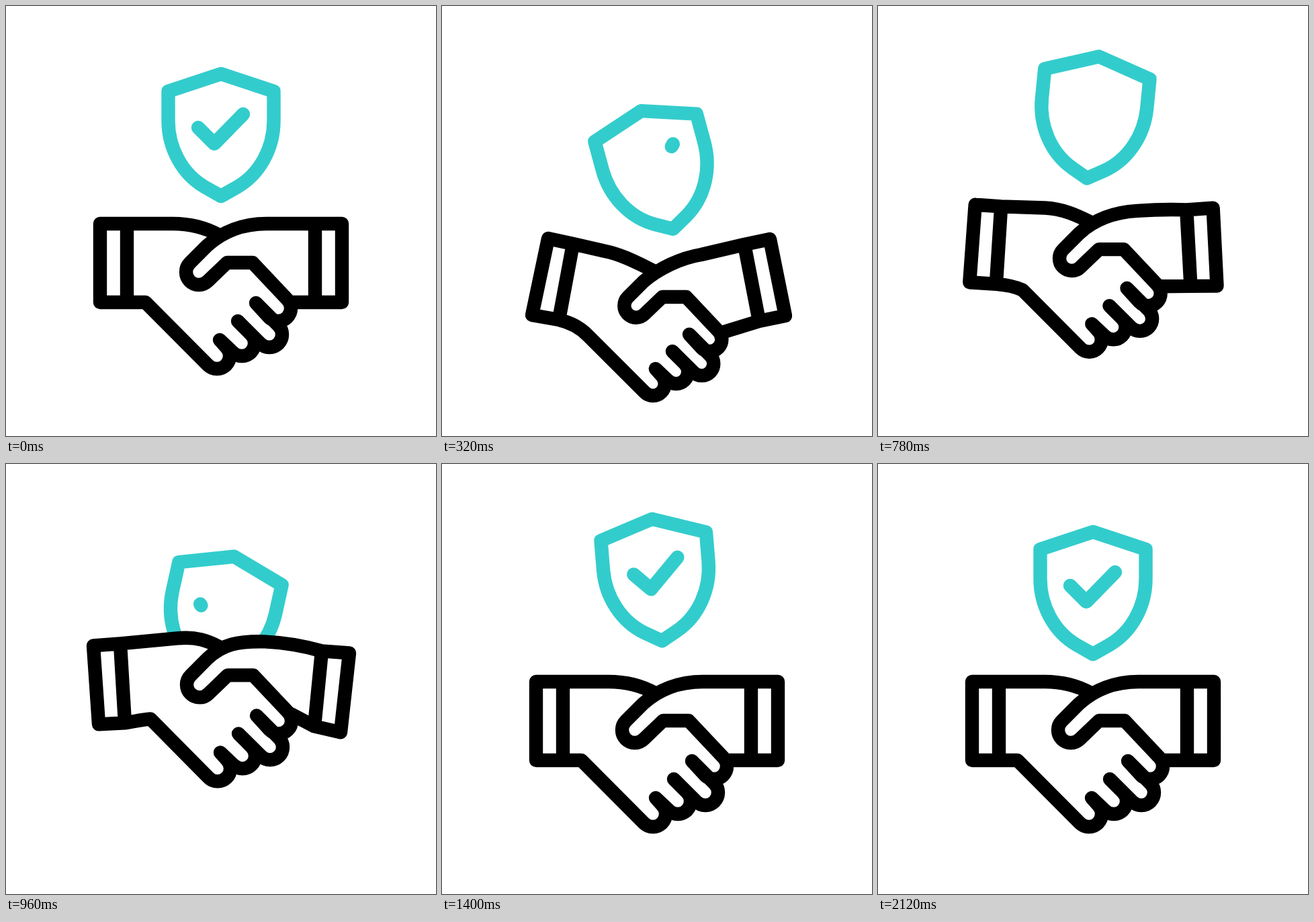
An HTML page with a canvas for the animation above (2400 ms loop, 640x640 px).

```html
<!DOCTYPE html>
<html lang="en">
<head>
<meta charset="utf-8">
<title>Handshake and shield</title>
<style>
html, body { margin: 0; width: 100%; height: 100%; overflow: hidden; background: #fff; }
canvas { display: block; width: 640px; height: 640px; }
</style>
</head>
<body>
<canvas id="stage" width="640" height="640"></canvas>
<script>
const ctx = document.getElementById('stage').getContext('2d');
const LOOP = 2400, STEP = 20;
const TEAL = '#33cccc', INK = '#000';

// Smooth curve through [time, value] keys, flat at each turning point.
function curve(keys) {
  const n = keys.length;
  const slope = i => (keys[i + 1][1] - keys[i][1]) / (keys[i + 1][0] - keys[i][0]);
  const tan = keys.map((k, i) => {
    if (i === 0 || i === n - 1) return 0;
    const a = slope(i - 1), b = slope(i);
    return a * b > 0 ? 2 * a * b / (a + b) : 0;
  });
  return t => {
    if (t <= keys[0][0]) return keys[0][1];
    if (t >= keys[n - 1][0]) return keys[n - 1][1];
    let i = 0;
    while (t > keys[i + 1][0]) i++;
    const [t0, v0] = keys[i], [t1, v1] = keys[i + 1];
    const d = t1 - t0, u = (t - t0) / d, w = 1 - u;
    return v0 * (1 + 2 * u) * w * w + v1 * u * u * (3 - 2 * u)
      + d * u * w * (tan[i] * w - tan[i + 1] * u);
  };
}

const handY = curve([[0, 0], [320, 40], [445, 58], [540, 48], [620, 28], [960, -67.6], [1005, -69], [1360, 0]]);
const lowMix = curve([[0, 0], [320, 1], [480, 1.12], [620, 1], [960, 0]]);
const highMix = curve([[620, 0], [960, 1], [1010, 1.04], [1360, 0]]);
const shieldY = curve([[0, 0], [320, 52], [370, 54], [620, -18.3], [720, -36], [960, 34.6], [990, 36.5], [1390, -19.5], [1825, 16.5], [2120, 0]]);
const shieldTilt = curve([[0, 0], [320, -15.2], [350, -15.5], [620, -3], [960, 12.5], [975, 12.6], [1400, -4.7], [1800, 2.9], [2120, 0]]);
const wipe = curve([[0, 0], [367, 1]]);
const write = curve([[925, 0], [1290, 1]]);

// Arm points: at rest, hands low, hands high (x, y each).
const ARMS = {
  cuffT:    [140, 324, 158, 306, 130, 338],
  cuffB:    [140, 441, 134, 420, 138, 455],
  bandT:    [180, 324, 195, 314, 170, 335],
  bandB:    [180, 441, 174, 427, 177, 453],
  wrist:    [248, 324, 243, 325, 255, 327],
  wristA:   [276, 324, 268, 330, 283, 324],
  wristB:   [299, 331, 292, 343, 301, 331],
  meet:     [317, 341, 317, 355, 318, 340],
  heelA:    [190, 441, 191, 431, 190, 451],
  heelB:    [200, 441, 206, 439, 203, 448],
  heel:     [207.5, 441, 217, 450.3, 215, 447],
  thumb:    [299, 357, 300, 370, 300, 357],
  thumbA:   [322, 336, 322, 351, 322, 336],
  thumbB:   [353, 324, 355, 335, 345, 331],
  back:     [388, 324, 386, 330, 385, 332],
  rBandT:   [460, 324, 450, 315, 470, 346],
  rCuffT:   [500, 324, 488, 307, 511, 349],
  rCuffB:   [500, 441, 511, 421, 498, 467],
  rBandB:   [460, 441, 472, 429, 459, 458],
  rEnd:     [425, 441, 420, 445, 425, 440]
};
const SLEEVE = [424, 324, 418, 322.5, 428, 334];

const FINGERS = [[314, 521], [351, 502], [392, 489], [405, 450]];
const SLOTS = [[318, 497], [345, 469], [372, 442]];
const TIP = 19;

const move = p => ctx.moveTo(p[0], p[1]);
const line = (...ps) => ps.forEach(p => ctx.lineTo(p[0], p[1]));
const bend = (a, b, c) => ctx.bezierCurveTo(a[0], a[1], b[0], b[1], c[0], c[1]);

function drawShield(t) {
  ctx.save();
  ctx.translate(320, 191.5 + shieldY(t));
  ctx.rotate(shieldTilt(t) * Math.PI / 180);
  ctx.translate(-320, -191.5);
  ctx.strokeStyle = TEAL;

  ctx.beginPath();
  ctx.moveTo(320, 101);
  ctx.lineTo(241.5, 127);
  ctx.lineTo(241.5, 171);
  ctx.bezierCurveTo(241.5, 211, 262, 250, 296, 269.5);
  ctx.lineTo(320, 283);
  ctx.lineTo(344, 269.5);
  ctx.bezierCurveTo(378, 250, 398.5, 211, 398.5, 171);
  ctx.lineTo(398.5, 127);
  ctx.closePath();
  ctx.stroke();

  const from = t < 925 ? wipe(t) : 0;
  const to = t < 925 ? 1 : write(t);
  if (to > from) {
    const len = 95.5;
    ctx.beginPath();
    ctx.moveTo(286, 181);
    ctx.lineTo(310, 205);
    ctx.lineTo(353, 161);
    if (to - from < 1) {
      ctx.setLineDash([(to - from) * len, 999]);
      ctx.lineDashOffset = -from * len;
    }
    ctx.stroke();
  }
  ctx.restore();
}

function drawHands(t) {
  const dy = handY(t), low = lowMix(t), high = highMix(t);
  const size = 1 - 0.07 * low;
  const hand = ([x, y]) => [315 + (x - 315) * size + high, 539 + (y - 539) * size + dy];
  const tip = (c, a, b, ccw) => {
    const [x, y] = hand(c);
    ctx.arc(x, y, TIP * size, a * Math.PI, b * Math.PI, ccw);
  };
  const finger = i => tip(FINGERS[i], 0.75, -0.25, true);

  const pose = ([x, y, lx, ly, hx, hy]) => [
    x + (lx - x) * low + (hx - x) * high,
    y + (ly - y) * low + (hy - y) * high + dy
  ];
  const p = {};
  for (const key in ARMS) p[key] = pose(ARMS[key]);
  const sleeve = pose(SLEEVE);

  const leftTop = () => {
    move(p.cuffB);
    line(p.cuffT, p.bandT, p.wrist);
    bend(p.wristA, p.wristB, p.meet);
  };
  const leftBottom = () => {
    line(p.bandB);
    bend(p.heelA, p.heelB, p.heel);
  };
  const rightArm = () => {
    bend(p.thumbA, p.thumbB, p.back);
    ctx.quadraticCurveTo(sleeve[0], sleeve[1], p.rBandT[0], p.rBandT[1]);
    line(p.rCuffT, p.rCuffB, p.rBandB, p.rEnd);
  };

  ctx.fillStyle = '#fff';
  ctx.beginPath();
  leftTop();
  line(...FINGERS.map(hand).reverse(), p.heel, p.bandB);
  ctx.fill();
  ctx.beginPath();
  move(p.thumb);
  rightArm();
  ctx.fill();

  ctx.strokeStyle = INK;
  ctx.beginPath();
  leftTop();
  move(p.cuffT);
  line(p.cuffB);
  leftBottom();
  finger(0);
  line(hand(SLOTS[0]));
  for (let i = 1; i < 3; i++) {
    finger(i);
    line(hand(SLOTS[i]));
  }
  finger(3);
  line(hand([367, 382]), hand([329, 382]));
  tip([287, 396], 0.25, 1.25, false);
  line(p.thumb);
  rightArm();
  move(p.bandT);
  line(p.bandB);
  move(p.rBandT);
  line(p.rBandB);
  ctx.stroke();
}

function draw(t) {
  ctx.fillStyle = '#fff';
  ctx.fillRect(0, 0, 640, 640);
  ctx.lineWidth = 20.4;
  ctx.lineCap = ctx.lineJoin = 'round';
  drawShield(t);
  drawHands(t);
}

let start = null;
function tick(now) {
  if (start === null) start = now;
  const t = (now - start) % LOOP;
  draw(Math.floor(t / STEP) * STEP);
  requestAnimationFrame(tick);
}
draw(0);
requestAnimationFrame(tick);
</script>
</body>
</html>
```
